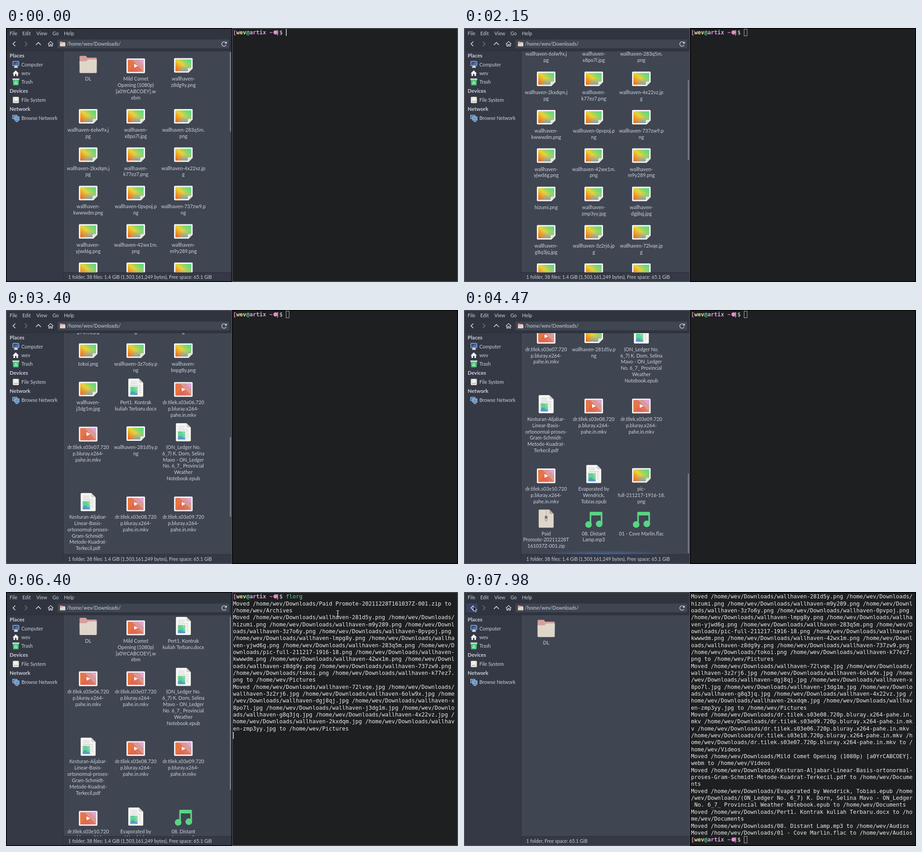
Write an HTML page that moves like this. It is 998x561 px and loops after 8000 ms.

```html
<!DOCTYPE html>
<html lang="en">
<head>
<meta charset="utf-8">
<title>Sorting a downloads folder</title>
<style>
html, body { margin: 0; width: 100%; height: 100%; overflow: hidden; background: #000; }
svg { display: block; width: 998px; height: 561px; }
text { white-space: pre; }
.ui { font: 10.8px Lato, sans-serif; fill: #cbd2dc; }
.ui .mid { text-anchor: middle; }
.ui .head { font-weight: 700; font-size: 11.6px; }
.ui .small { font-size: 10.5px; }
.term { font: 12.136px "DejaVu Sans Mono", monospace; fill: #ececec; }
.b { font-weight: 700; }
.red { fill: #e08fcb; }
.yellow { fill: #e2e3a4; }
.green { fill: #5bdb8c; }
.blue { fill: #dba6e4; }
.line { fill: none; stroke: #d3dae3; stroke-width: 1.7; }
</style>
</head>
<body>
<svg viewBox="0 0 998 561">
  <defs>
    <linearGradient id="rainbow" x1="0" y1="1" x2="1" y2="0.1">
      <stop offset="0" stop-color="#e8601f"/>
      <stop offset=".3" stop-color="#eda02b"/>
      <stop offset=".52" stop-color="#e9d437"/>
      <stop offset=".75" stop-color="#8fd667"/>
      <stop offset="1" stop-color="#52db88"/>
    </linearGradient>
    <radialGradient id="haze" cx=".68" cy="1" r=".6">
      <stop offset="0" stop-color="#6fa5cc" stop-opacity=".95"/>
      <stop offset="1" stop-color="#6fa5cc" stop-opacity="0"/>
    </radialGradient>
    <radialGradient id="glowFill">
      <stop offset="0" stop-color="#5294e2" stop-opacity=".5"/>
      <stop offset="1" stop-color="#5294e2" stop-opacity="0"/>
    </radialGradient>
    <clipPath id="view"><rect x="127" y="51" width="371" height="488.5"/></clipPath>

    <!-- Icons: x centred, y = 0 at the middle of the first label line -->
    <g id="dir">
      <path d="M-19-49a2 2 0 0 1 2-2H-5l3 4H17a2 2 0 0 1 2 2V-30H-19z" fill="#d3a09f"/>
      <path d="M-19-39H-4l4-4H19V-15a2 2 0 0 1-2 2H-17a2 2 0 0 1-2-2z" fill="#dfd6ca"/>
    </g>
    <g id="img">
      <path d="M-18.5-46H18.5a2 2 0 0 1 2 2V-23L11.5-14H-18.5a2 2 0 0 1-2-2V-44a2 2 0 0 1 2-2z" fill="#f6f6f4"/>
      <path d="M-17.5-43H17.5V-24H13a3 3 0 0 0-3 3V-17H-17.5z" fill="url(#rainbow)"/>
      <path d="M-17.5-43H17.5V-24H13a3 3 0 0 0-3 3V-17H-17.5z" fill="url(#haze)"/>
      <path d="M20.5-23H14a2.5 2.5 0 0 0-2.5 2.5V-14z" fill="#e2e2df"/>
    </g>
    <g id="vid">
      <rect x="-20.5" y="-45.3" width="41" height="32.6" rx="2.2" fill="#f6f3f2"/>
      <path d="M-17.5-42.3H17.5V-15.7H-17.5z" fill="#e5725f"/>
      <path d="M-17.5-15.7V-42.3L-6-30z" fill="#e8763c"/>
      <path d="M-8-42.3H17.5V-15.7z" fill="#d79c94"/>
      <path d="M5-42.3H17.5V-30z" fill="#e2a2dc"/>
      <path d="M-17.5-15.7L-6-30 6-15.7z" fill="#e0684f"/>
      <path d="M-3.5-33.2V-24.8L4.5-29z" fill="#fff"/>
    </g>
    <path id="page" d="M-14.5-53H7L16.5-43.5V-15a2 2 0 0 1-2 2H-14.5a2 2 0 0 1-2-2V-51a2 2 0 0 1 2-2z"/>
    <path id="fold" d="M7-53V-45.5a2 2 0 0 0 2 2H16.5z"/>
    <g id="doc">
      <use href="#page" fill="#f5f5f2"/>
      <use href="#fold" fill="#d3d3d0"/>
      <path d="M-11-46H3M-11-42H3M-11-38H11M7-34H11M7-30H11M7-26H11M7-22H11" stroke="#cfcfcc" stroke-width="1.4"/>
      <rect x="-12" y="-35" width="16" height="18" rx="1" fill="#5fd48f"/>
      <path d="M-4-35H3a1 1 0 0 1 1 1V-22z" fill="#8bd8b4"/>
      <path d="M-12-18V-21Q-8-28-4-24T4-20V-18a1 1 0 0 1-1 1H-11a1 1 0 0 1-1-1z" fill="#5a98cf"/>
    </g>
    <g id="zip">
      <use href="#page" fill="#dfd6ca"/>
      <use href="#fold" fill="#d3a09f"/>
      <path d="M0-53V-38" stroke="#b9b0a5" stroke-width="2" stroke-dasharray="1.5 1.5"/>
      <path d="M-3-39H3L2-28H-2z" fill="#707070"/>
      <rect x="-1.2" y="-33" width="2.4" height="4" fill="#eee"/>
    </g>
    <g id="mus" fill="#5ad584">
      <path d="M-9-46a2 2 0 0 1 2-2H17a2 2 0 0 1 2 2V-21H15.5V-40H-5.5V-19H-9z"/>
      <circle cx="-11.5" cy="-20" r="7.3"/><circle cx="12" cy="-21.5" r="7.3"/>
    </g>
  </defs>

  <g class="ui">
    <path d="M0 0H499V561H0z" fill="#2f343f"/>
    <path d="M0 51H126V561H0z" fill="#353945"/>
    <path d="M126 540H499V561H126z" fill="#353945"/>
    <path d="M127 51H498V539.5H127z" fill="#404552"/>
    <path d="M126.5 51V561M127 539.7H498M0 50.7H498" stroke="#2b2e39" stroke-width=".8"/>

    <rect id="backHover" x="5" y="25" width="25" height="20" rx="2" fill="#36426a"/>
    <path class="line" d="M20.5 30L15.5 35 20.5 40"/>
    <path class="line" d="M41.5 30L46.5 35 41.5 40" style="stroke:#6b727f"/>
    <path class="line" d="M66 37.5L71.5 32 77 37.5"/>
    <path class="line" d="M92.5 35.5L98.5 29.8 104.5 35.5M94.5 34.5V40H97.2V36.5H99.8V40H102.5V34.5" style="stroke-width:1.3"/>
    <rect x="113" y="25" width="380.5" height="20.5" rx="2" fill="#404552" stroke="#2b303b" stroke-width=".8"/>
    <path d="M119 31q0-1 1-1h4l1 1h5v4h-11z" fill="#d3a09f"/>
    <path d="M119 34h5l1-1.5h6v7q0 1-1 1h-10q-1 0-1-1z" fill="#dfd6ca"/>
    <path class="line" d="M485.5 32.5A5 5 0 1 0 486 37.5" style="stroke-width:1.3"/>
    <path d="M487.5 29.5V34.5H482.5z" fill="#d3dae3"/>

    <rect x="15" y="73.5" width="13.5" height="10" rx="1" fill="#31528f" stroke="#cfd5dc"/>
    <path d="M16 83L27 74.5V83z" fill="#4b75b5"/>
    <path d="M19 84H25L26.5 88H17.5z" fill="#cfd5dc"/>
    <path d="M14.5 100.5L21.5 93.5 28.5 100.5H26.5V106H23V101.500H20V106H16.500V100.5z" fill="#f4f4f2"/>
    <path d="M15 114H28.5L27.5 126.5H16z" fill="#4cc77c"/>
    <rect x="14" y="111.5" width="15.5" height="3" rx="1" fill="#d8ddd8"/>
    <path d="M21.7 117.5L24.7 122.8H18.7z" fill="none" stroke="#eafff0"/>
    <rect x="15" y="152" width="13.5" height="14" rx="2" fill="#e6e3da"/>
    <path d="M17 162.5H26.5" stroke="#bab6aa" stroke-width="1.5"/>
    <circle cx="21.7" cy="157" r="3.2" fill="#f6f4ee"/>
    <rect x="14.5" y="192.5" width="10" height="8" fill="#3f7fc4" stroke="#c9d6e4" stroke-width=".8"/>
    <rect x="19" y="196" width="10" height="8" fill="#5a9bdb" stroke="#d9e4ee" stroke-width=".8"/>
    <path d="M21 206.5H27" stroke="#d9e4ee" stroke-width="1.3"/>
    <g id="labels"></g>

    <g clip-path="url(#view)">
      <g id="files"></g>
      <ellipse id="glow" cx="312" cy="540" rx="150" ry="9" fill="url(#glowFill)"/>
      <rect id="thumb" x="494.2" width="2.7" rx="1.3" fill="#767c89"/>
    </g>
  </g>

  <g class="term">
    <path d="M499 0H998V561H499z" fill="#1d1f21"/>
    <circle id="badge" cx="595" r="4.6" fill="#e08fcb"/>
    <g id="rows"></g>
    <rect id="beam" width="1.46" height="15.34" fill="#ececec"/>
    <rect id="box" width="6.6" height="14.6" fill="none" stroke="#d8d8d8" stroke-width=".8"/>
  </g>

  <rect id="leftEdge" x=".73" y=".73" width="497.6" height="559.54" fill="none" stroke-width="1.46"/>
  <rect id="rightEdge" x="499.73" y=".73" width="497.54" height="559.54" fill="none" stroke-width="1.46"/>
  <path id="ibeam" d="M-3-6.5Q0-6.5 0-4.5V4.5Q0 6.5-3 6.5M3-6.5Q0-6.5 0-4.5M0 4.5Q0 6.5 3 6.5M-1.5 0H1.5" fill="none" stroke="#e4e4e4" stroke-width="1.1"/>
  <path id="arrow" d="M0 0V11.5L2.7 9 4.5 13.2 6.4 12.4 4.6 8.3H8.3z" fill="#0a0a0a" stroke="#fff" stroke-width=".9"/>
</svg>

<script>
const $ = id => document.getElementById(id);
const USER = 'wev', HOME = `/home/${USER}/`, DIR = HOME + 'Downloads/';
const COLS = 67, ROWS = 36, CELL = 7.306, PITCH = 15.343, TERM_X = 501.2, TERM_Y = 2.2;
const TOP = 112.5, LINE = 13.88, ROW = 84.75, NOTCH = 55.8, BOTTOM = 830;

// '|' breaks a label, '~' stands for the common prefix
const episode = n => `dr.tilek.s03e${n}.720|p.bluray.x264-|pahe.in.mkv`;
const names = [
  'DL', 'Mild Comet |Opening (1080p) |[a0YrCABCOEY].w|ebm', '~|z8dg9y.png',
  '~6olw9x.j|pg', '~|x8po7l.jpg', '~283q5m.|png',
  '~2kxdqm.j|pg', '~|k77ez7.png', '~4x22vz.jp|g',
  '~|kwwwdm.png', '~0pvpoj.p|ng', '~737zw9.p|ng',
  '~|yjwd6g.png', '~42wx1m.|png', '~|m9y289.png',
  'hizumi.png', '~|zmp3yy.jpg', '~|dgj8qj.jpg',
  '~|g8q3jq.jpg', '~3z2rj6.jp|g', '~72lvqe.jp|g',
  'tokoi.png', '~3z7o6y.p|ng', '~|lmpg8y.png',
  '~|j3dg1m.jpg', 'Pert1. Kontrak |kuliah Terbaru.docx', episode('06'),
  episode('07'), '~281d5y.p|ng',
  '(ON_Ledger No. |6_7) K. Dorn, Selina |Mavo - ON_Ledger |No. 6_7_ Provincial |Weather |Notebook.epub',
  'Kesturan-Aljabar-|Linear-Basis-|ortonormal-proses-|Gram-Schmidt-|Metode-Kuadrat-|Terkecil.pdf',
  episode('08'), episode('09'),
  episode('10'), 'Evaporated by |Wendrick, |Tobias.epub', 'pic-|full-211217-1916-18.|png',
  'Paid |Promote-20211228T|161037Z-001.zip', '08. Distant |Lamp.mp3', '01 - Cove Marlin.flac'
].map(n => n.replace('~', 'wallhaven-'));

const kinds = { png: 'img', jpg: 'img', mkv: 'vid', webm: 'vid', docx: 'doc', epub: 'doc', pdf: 'doc', mp3: 'mus', flac: 'mus', zip: 'zip' };
const plain = n => n.replaceAll('|', '');
const kindOf = n => kinds[plain(n).split('.').pop()] || 'dir';

const label = (x, y, s, cls = '') => `<text class="${cls}" x="${x}" y="${(y + 3.7).toFixed(1)}">${s}</text>`;

$('labels').innerHTML = [
  [8, 12, 'File'], [36, 12, 'Edit'], [67, 12, 'View'], [102.5, 12, 'Go'], [128, 12, 'Help'],
  [134.5, 35, DIR], [8, 61.5, 'Places', 'head'], [34, 81, 'Computer'], [34, 100, USER], [34, 119, 'Trash'],
  [8, 139.5, 'Devices', 'head'], [34, 159, 'File System'], [8, 179.5, 'Network', 'head'], [34, 199, 'Browse Network']
].map(a => label(...a)).join('') + '<text id="status" class="small" x="137.5" y="553.7"></text>';

// Lays the files out three to a row; row height follows the longest label
function grid(list) {
  const spots = [];
  let y = TOP, html = '';
  for (let i = 0; i < list.length; i += 3) {
    let most = 2;
    list.slice(i, i + 3).forEach((name, c) => {
      const x = 181.4 + 105.1 * c, parts = name.split('|');
      most = Math.max(most, parts.length);
      spots.push([x, y]);
      html += `<use href="#${kindOf(name)}" x="${x}" y="${y}"/>` +
        parts.map((p, k) => label(x, y + k * LINE, p.trim(), 'mid')).join('');
    });
    y += ROW + LINE * (most - 2 + (most > 4));
  }
  return { html: `<g>${html}</g>`, height: y - TOP, spots };
}

const isKept = n => !['img', 'zip'].includes(kindOf(n));
const grids = [names, names.filter(isKept), names.slice(0, 1)].map(grid);
$('files').innerHTML = grids.map(g => g.html).join('') +
  '<rect id="hover" width="41" height="32" rx="2" fill="#fff" opacity=".22"/>';
const groups = [...$('files').children].slice(0, 3);

const moved = (ids, to) => `Moved ${ids.map(i => DIR + plain(names[i])).join(' ')} to ${HOME}${to}`;
const messages = [
  moved([36], 'Archives'),
  moved([28, 15, 14, 22, 10, 23, 12, 5, 35, 9, 13, 2, 11, 21, 7], 'Pictures'),
  moved([20, 19, 3, 17, 4, 24, 18, 8, 6, 16], 'Pictures'),
  moved([31, 32, 26, 33, 27], 'Videos'),
  moved([1], 'Videos'),
  moved([30], 'Documents'),
  moved([34, 29], 'Documents'),
  moved([25], 'Documents'),
  moved([37], 'Audios'),
  moved([38], 'Audios')
].map(m => m.match(new RegExp(`.{1,${COLS}}`, 'g')));

const tint = (cls, s) => `<tspan class="${cls}">${s}</tspan>`;
const PROMPT = tint('b red', '[') + tint('b yellow', USER) + tint('b green', '@') + tint('b blue', 'artix') +
  tint('b red', ' ~ ]') + '$ ';
const COMMAND = 'florg';

$('rows').innerHTML = Array.from({ length: ROWS }, (_, i) =>
  `<text x="${TERM_X}" y="${(TERM_Y + 12 + i * PITCH).toFixed(2)}"></text>`).join('');
const rows = [...$('rows').children];

const keyTimes = [5460, 5630, 5830, 5920, 6010];
const outTimes = [6230, 6290, 6400, 6460, 6460, 6510, 6510, 6510, 6560, 6560];
const wheelTimes = [2030, 2090, 2150, 2270, 2330, 2380, 2950, 3190, 3260, 3330, 3400, 3510, 3550, 3960, 4000];
const ENTER = 6180, DONE = 6560;

const past = (times, t) => times.filter(x => t >= x).length;
const clamp = x => Math.min(1, Math.max(0, x));
const ease = x => x * x * (3 - 2 * x);
const show = (el, on) => el.style.display = on ? '' : 'none';
const put = (el, attrs) => { for (const k in attrs) el.setAttribute(k, attrs[k]); };

let lastScreen = '';
function drawTerminal(t, focused) {
  const typed = past(keyTimes, t), out = past(outTimes, t);
  const word = tint(typed < COMMAND.length ? 'red' : 'green', COMMAND.slice(0, typed));
  let lines = [PROMPT + word, ...messages.slice(0, out).flat()];
  let col = 16 + typed;
  if (t >= ENTER) {
    lines.push(t >= DONE ? PROMPT : '');
    col = t >= DONE ? 16 : 0;
  }
  lines = lines.slice(-ROWS);
  const screen = lines.join('\n');
  if (screen !== lastScreen) {
    rows.forEach((r, i) => r.innerHTML = lines[i] || '');
    lastScreen = screen;
  }
  const last = lines.length - 1, x = TERM_X + col * CELL, y = TERM_Y + last * PITCH;
  $('badge').setAttribute('cy', 9.8 + (t >= DONE ? last * PITCH : 0));
  put($('beam'), { x, y });
  put($('box'), { x: x + 0.4, y: y + 0.4 });
  show($('beam'), focused);
  show($('box'), !focused);
}

function drawFiles(t) {
  const which = past([6340, 6510], t);
  const scroll = [Math.min(BOTTOM, NOTCH * past(wheelTimes, t)), 4.4, 0][which];
  groups.forEach((g, i) => {
    show(g, i === which);
    g.setAttribute('transform', `translate(0 ${-scroll})`);
  });
  show($('thumb'), which < 2);
  put($('thumb'), { y: 53 + scroll * 0.371, height: 231000 / grids[which].height });
  $('status').textContent = t < DONE
    ? '1 folder, 38 files: 1.4 GiB (1,503,161,249 bytes), Free space: 65.1 GiB'
    : '1 folder, Free space: 65.1 GiB';

  const over = t >= 230 && t < 430 ? 7 : t >= 550 && t < 700 ? 5 : -1;
  show($('hover'), over >= 0);
  if (over >= 0) {
    const [x, y] = grids[0].spots[over];
    put($('hover'), { x: x - 20.5, y: y - 46 });
  }
  $('glow').style.opacity = t < 4470 ? clamp((t - 4230) / 200) : clamp((4900 - t) / 430);
  show($('backHover'), t >= 7980);
}

// Pointer enters the terminal, rests, then travels to the back button
function pointerAt(t) {
  const a = ease(clamp((t - 4720) / 250)), b = ease(clamp((t - 7150) / 790));
  const x = 510 + 222.5 * a, y = 140 - 92.5 * a;
  return [x + (20.5 - x) * b, y + (31 - y) * b];
}

function draw(t) {
  const [x, y] = pointerAt(t), inTerm = x > 499, seen = t >= 4720;
  const focused = seen ? inTerm : t < 950;
  drawTerminal(t, focused);
  drawFiles(t);
  $('leftEdge').setAttribute('stroke', focused ? '#000' : '#54585b');
  $('rightEdge').setAttribute('stroke', focused ? '#54585b' : '#000');
  for (const [id, on] of [['ibeam', seen && inTerm], ['arrow', seen && !inTerm]]) {
    show($(id), on);
    $(id).setAttribute('transform', `translate(${x.toFixed(1)} ${y.toFixed(1)})`);
  }
}

const start = performance.now();
function tick() {
  draw((performance.now() - start) % 8000);
  requestAnimationFrame(tick);
}
tick();
</script>
</body>
</html>
```
